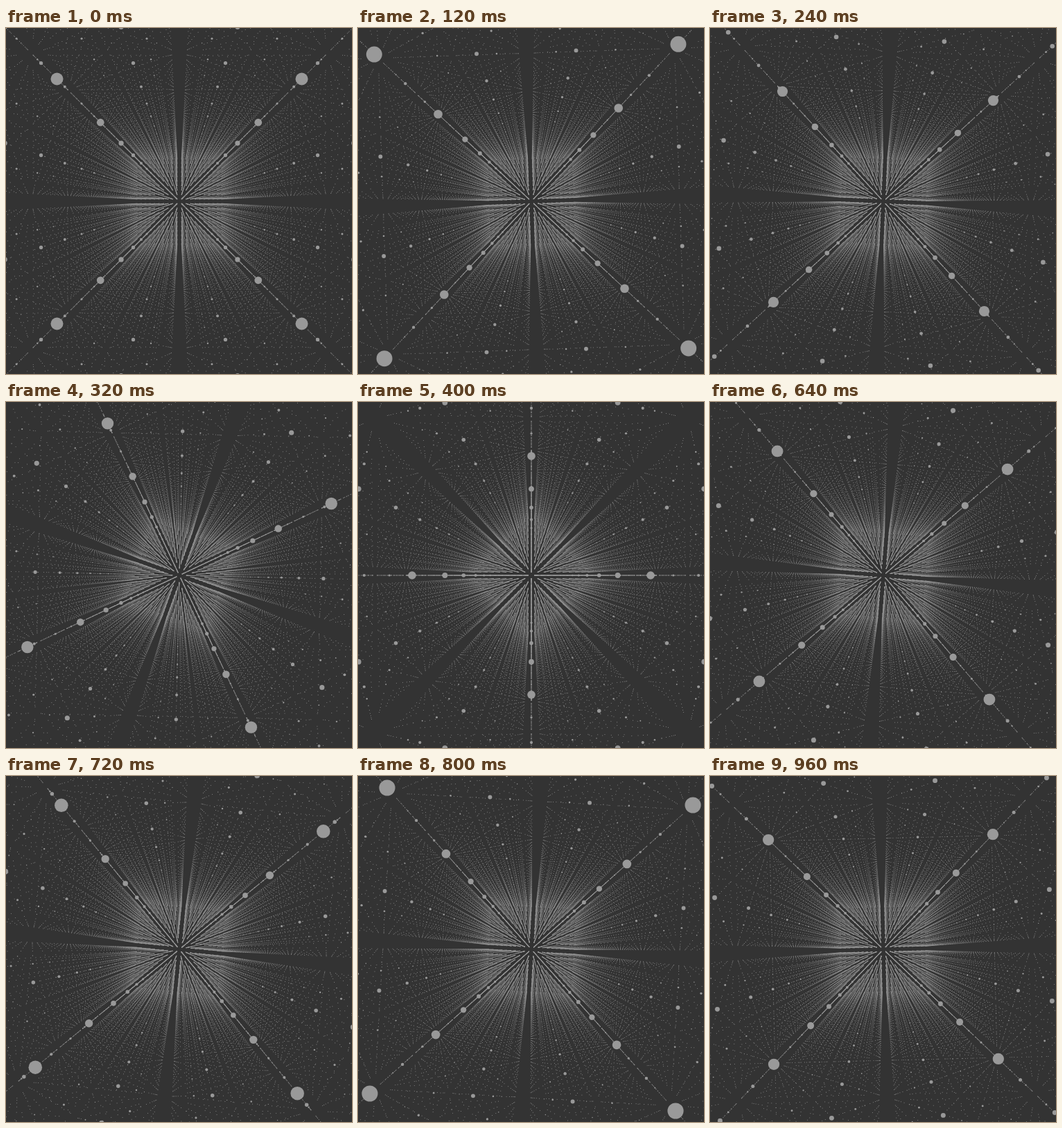
An HTML page with a canvas for the animation above (1 s loop, 499 px wide and 499 px high).

```html
<!DOCTYPE html>
<html lang="en">
<head>
<meta charset="utf-8">
<title>Lattice flight</title>
<style>
  html, body { margin: 0; width: 100%; height: 100%; overflow: hidden; background: #333; }
  canvas { display: block; }
</style>
</head>
<body>
<canvas id="stage" width="499" height="499"></canvas>
<script>
const SIZE = 499;
const MID = 250;
const LOOP = 1000;
const STEP = 40;
const FOCAL = 640;      // pixels per lattice cell at depth 1
const HALF = 10;        // cells on each side of the axis
const DEPTH = 100;      // planes in view
const START = 1.813;    // depth phase at the loop start
const SPEED = 0.002955; // cells per millisecond

// Roll of the camera: time, degrees, degrees per millisecond
const ROLL = [
  [0, 0, 0.015],
  [240, 2.45, 0.12],
  [400, 45, 0.32],
  [520, 80.6, 0.21],
  [640, 94.5, 0.05],
  [800, 93.25, -0.04],
  [960, 88.6, 0.01],
  [1000, 90, 0.015]
];

const ctx = document.getElementById("stage").getContext("2d");

function rollAt(t) {
  const n = ROLL.findIndex(key => key[0] > t);
  const [t0, a0, m0] = ROLL[n - 1];
  const [t1, a1, m1] = ROLL[n];
  const span = t1 - t0;
  const u = (t - t0) / span;
  const v = 1 - u;
  return v * v * (1 + 2 * u) * a0 + u * u * (3 - 2 * u) * a1
    + span * u * v * (v * m0 - u * m1);
}

// Dots shrink with depth down to a fine speck
function radiusAt(z) {
  return Math.max(0.43, 18.5 / z - 1.2);
}

function dot(x, y, r) {
  if (x < -r || y < -r || x > SIZE + r || y > SIZE + r) return;
  if (r < 0.6) {
    ctx.fillRect(x - r, y - r, 2 * r, 2 * r);
    return;
  }
  ctx.beginPath();
  ctx.arc(x, y, r, 0, Math.PI * 2);
  ctx.fill();
}

function draw(t) {
  ctx.fillStyle = "#333";
  ctx.fillRect(0, 0, SIZE, SIZE);
  ctx.fillStyle = "#999";

  const roll = rollAt(t) * Math.PI / 180;
  const cos = Math.cos(roll);
  const sin = Math.sin(roll);
  const travel = START - SPEED * t;
  const near = travel - Math.floor(travel);

  for (let k = DEPTH - 1; k >= 0; k--) {
    const z = near + k;
    if (z < 0.2) continue;
    const scale = FOCAL / z;
    const r = radiusAt(z);
    for (let i = 0.5; i < HALF; i++) {
      for (let j = 0.5; j < HALF; j++) {
        const x = (i * cos - j * sin) * scale;
        const y = (i * sin + j * cos) * scale;
        // The lattice repeats every quarter turn
        dot(MID + x, MID + y, r);
        dot(MID - y, MID + x, r);
        dot(MID - x, MID - y, r);
        dot(MID + y, MID - x, r);
      }
    }
  }
}

const begin = performance.now();
let shown = -1;

function tick() {
  const elapsed = Math.max(0, performance.now() - begin) % LOOP;
  const t = Math.floor(elapsed / STEP) * STEP;
  if (t !== shown) {
    draw(t);
    shown = t;
  }
  requestAnimationFrame(tick);
}

tick();
</script>
</body>
</html>
```
